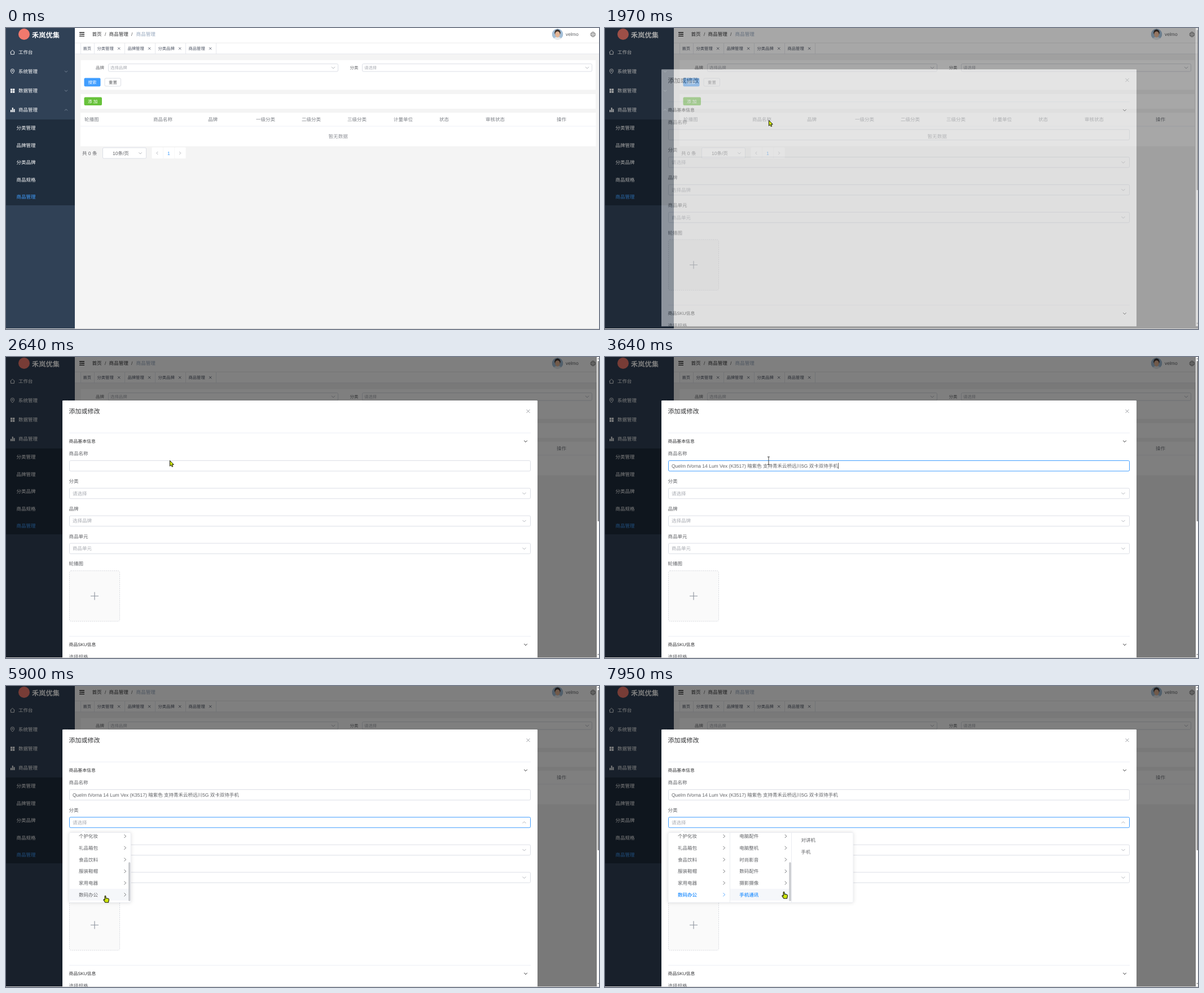
Recreate the animation shown at these times as an HTML page. Size 1051 by 533 pixels, loop 8000 ms.

```html
<!DOCTYPE html>
<html lang="zh-CN">
<head>
<meta charset="utf-8">
<title>商品管理</title>
<style>
html, body { margin: 0; width: 100%; height: 100%; overflow: hidden; background: #f4f4f4; }
svg { display: block; width: 1051px; height: 533px; }
text { font-family: "Liberation Sans", "Noto Sans CJK SC", "Noto Sans CJK", sans-serif; text-rendering: geometricPrecision; white-space: pre; }
</style>
</head>
<body>
<svg id="stage" viewBox="0 0 1051 533">
  <defs>
    <clipPath id="view"><rect width="1051" height="532"/></clipPath>
    <clipPath id="list"><rect x="112" y="260" width="330" height="123"/></clipPath>
    <clipPath id="face"><circle cx="977.5" cy="11" r="10"/></clipPath>
    <filter id="shadow" x="-10%" y="-10%" width="120%" height="120%">
      <feDropShadow dx="0" dy="0" stdDeviation="3" flood-color="#000" flood-opacity=".13"/>
    </filter>
  </defs>
</svg>
<script>
const LOOP = 8000, BLUE = '#409eff', TEXT = '#606266', HINT = '#a8abb2', LINE = '#dcdfe6';
const stage = document.getElementById('stage');

function el(tag, attrs, parent) {
  const node = document.createElementNS('http://www.w3.org/2000/svg', tag);
  for (const k in attrs) node.setAttribute(k, attrs[k]);
  return (parent || layer).appendChild(node);
}
const group = (parent, attrs = {}) => el('g', attrs, parent);
const rect = (x, y, w, h, fill, rx = 0) => el('rect', { x, y, width: w, height: h, fill, rx });
const box = (x, y, w, h, fill = '#fff', stroke = LINE, rx = 2) =>
  el('rect', { x: x + .5, y: y + .5, width: w - 1, height: h - 1, fill, stroke, rx });
const path = (d, stroke, width = 1, fill = 'none') =>
  el('path', { d, stroke, 'stroke-width': width, fill, 'stroke-linejoin': 'round' });
function text(x, cy, str, size = 8.5, fill = TEXT, extra = {}) {
  const node = el('text', { x, y: cy + size * .37, 'font-size': size, fill, ...extra });
  node.textContent = str;
  return node;
}
function chevron(x, y, r, angle, stroke, width = .9) {
  const g = group(layer, { transform: `translate(${x} ${y}) rotate(${angle})` });
  return el('path', { d: `M${-r} ${-r / 2}L0 ${r / 2}L${r} ${-r / 2}`, fill: 'none', stroke, 'stroke-width': width }, g);
}
const cross = (x, y, r, stroke, width = .8) =>
  path(`M${x - r} ${y - r}l${2 * r} ${2 * r}m0 ${-2 * r}l${-2 * r} ${2 * r}`, stroke, width);
const show = (node, on) => node.setAttribute('visibility', on ? 'visible' : 'hidden');

// Page
let layer = group(stage);
rect(0, 0, 1051, 533, '#f4f4f4');
rect(0, 0, 122, 532, '#304156');
rect(0, 162, 122, 152, '#1f2d3d');
el('circle', { cx: 32, cy: 11, r: 10, fill: '#f0796d' });
text(46, 12, '禾岚优集', 12.25, '#fff', { 'font-weight': 700 });
['工作台', '系统管理', '数据管理', '商品管理'].forEach((s, i) => text(22, 43 + i * 34.1, s, 8.5, '#fff'));
['分类管理', '品牌管理', '分类品牌', '商品规格', '商品管理'].forEach((s, i) =>
  text(18.5, 177.3 + i * 30.4, s, 8.5, i == 4 ? BLUE : '#fff'));
path('M7.5 43L11.5 39.3 15.5 43M8.6 42.2V46.6H14.4V42.2', '#fff', .9);
path('M11.5 81C9.4 78.6 8.3 77.2 8.3 75.8A3.2 3.2 0 0 1 14.7 75.8C14.7 77.2 13.6 78.6 11.5 81Z', '#fff', .9);
el('circle', { cx: 11.5, cy: 75.8, r: 1.1, fill: 'none', stroke: '#fff', 'stroke-width': .8 });
for (const [x, y] of [[8, 107.5], [12, 107.5], [8, 111.5], [12, 111.5]]) rect(x, y, 3.3, 3.3, '#fff');
for (const [x, h] of [[8, 4], [10.8, 8], [13.6, 5.5]]) rect(x, 149 - h, 1.9, h, '#fff');
chevron(106.5, 77, 2.5, 0, '#8a97a8', .8);
chevron(106.5, 111, 2.5, 0, '#8a97a8', .8);
chevron(106.5, 145, 2.5, 180, '#8a97a8', .8);

rect(122, 0, 929, 46, '#fff');
rect(122, 26, 929, 1, '#ebebeb');
rect(122, 45.5, 929, .8, '#dfe2e8');
path('M130 8H139M133 11.2H139M130 14.4H139', '#222', 1.4);
path('M132.3 9.6V12.8L130 11.2Z', 'none', 0, '#222');
text(152.5, 11.2, '首页', 8.6, '#303133');
text(175, 11.2, '/', 8.6, '#555');
text(182.5, 11.2, '商品管理', 8.6, '#303133');
text(222, 11.2, '/', 8.6, '#555');
text(230.5, 11.2, '商品管理', 8.6, '#97a8be');
const face = group(layer, { 'clip-path': 'url(#face)' });
el('circle', { cx: 977.5, cy: 11, r: 10, fill: '#a3bfd8' }, face);
el('ellipse', { cx: 977.5, cy: 21, rx: 8, ry: 5, fill: '#e6e9ec' }, face);
el('ellipse', { cx: 977.5, cy: 8.3, rx: 5.3, ry: 5.8, fill: '#3d3532' }, face);
el('ellipse', { cx: 977.5, cy: 11.3, rx: 4.3, ry: 5.4, fill: '#e3b596' }, face);
text(992, 11, 'velmo');
const GLOBE = '#666';
el('circle', { cx: 1040.3, cy: 11.4, r: 4.2, fill: 'none', stroke: GLOBE, 'stroke-width': .8 });
el('ellipse', { cx: 1040.3, cy: 11.4, rx: 1.8, ry: 4.2, fill: 'none', stroke: GLOBE, 'stroke-width': .7 });
path('M1036.2 10H1044.4M1036.2 12.9H1044.4', GLOBE, .7);

rect(132, 27, .8, 19, '#e2e4e9');
text(136.5, 36.2, '首页', 7.3, '#495060');
['分类管理', '品牌管理', '分类品牌', '商品管理'].forEach((s, i) => {
  const x = 156 + i * 54;
  rect(x, 27, .8, 19, '#e2e4e9');
  text(x + 5.5, 36.2, s, 7.3, '#495060');
  cross(x + 44.2, 36.3, 2.1, '#495060');
});
rect(372, 27, .8, 19, '#e2e4e9');

rect(132.5, 57, 912.5, 52.5, '#fff');
[[159, 181, '品牌', '选择品牌'], [609.5, 631, '分类', '请选择']].forEach(([lx, x, label, hint]) => {
  text(lx, 70, label, 7.4);
  box(x, 63, 408, 14.5);
  text(x + 4, 70.2, hint, 7.4, HINT);
  chevron(x + 399, 70.3, 3, 0, HINT);
});
rect(138.5, 88.5, 29, 15, BLUE, 2);
text(145.5, 96, '搜索', 7.4, '#fff');
box(174.5, 88.5, 29.5, 15);
text(182, 96, '重置', 7.4);
rect(132.5, 117, 912.5, 26, '#fff');
const addBtn = rect(138.5, 122.5, 31.5, 14.5, '#67c23a', 2);
text(145, 129.8, '添 加', 7.6, '#fff');

rect(132, 150, 913.5, 59.5, '#fff');
rect(132, 173.5, 913.5, .8, '#ebeef5');
const columns = { 轮播图: 139, 商品名称: 261, 品牌: 358, 一级分类: 443, 二级分类: 524, 三级分类: 605, 计量单位: 687, 状态: 768, 审核状态: 850, 操作: 976 };
for (const s in columns) text(columns[s], 162, s, 8.5, '#7d8087');
text(571.5, 192, '暂无数据', 8.6, '#909399');
text(135, 222, '共 0 条');
box(171, 211.5, 78, 20);
text(189, 222, '10条/页');
chevron(238, 221.7, 2.7, 0, HINT);
for (const x of [258.5, 278.8, 299]) rect(x, 211.5, 19.6, 19.5, '#fff', 1);
chevron(268, 221.5, 2.5, 90, HINT);
text(286, 222, '1', 8.5, BLUE);
chevron(308.5, 221.5, 2.5, -90, HINT);
rect(0, 532, 1051, 1, '#d6d6d6');

// Dialog
const mask = group(stage, { 'clip-path': 'url(#view)' });
layer = mask;
rect(0, 0, 1051, 532, 'rgba(0,0,0,.5)');
const dialog = layer = group(mask, { 'clip-path': 'url(#view)' });
rect(1047, 0, 4, 532, '#fafafa');
rect(1048.6, 7, 2.4, 284, '#8b8b8b', 1);
path('M1048.3 4L1051 4 1049.7 2ZM1048.3 526L1051 526 1049.7 528Z', 'none', 0, '#777');
rect(100, 77, 842, 460, '#fff', 1);
text(111.5, 96.3, '添加或修改', 11, '#303133');
cross(925.5, 96, 3, '#909399', .9);
for (const [y, s] of [[149, '商品基本信息'], [509, '商品SKU信息']]) {
  rect(112, y - 15, 818, .9, '#ebeef5');
  text(111.5, y, s, 7.9, '#303133');
  chevron(921, y + .3, 2.8, 0, '#303133', 1);
}
const fields = [['商品名称', ''], ['分类', '请选择'], ['品牌', '选择品牌'], ['商品单元', '商品单元']].map(([label, hint], i) => {
  const y = 183 + i * 48.8;
  text(111.5, y - 12, label);
  const frame = box(112, y, 818, 19.5);
  text(118, y + 9.7, hint, 8.5, HINT);
  return { frame, arrow: hint && chevron(918.5, y + 9.8, 3, 0, HINT) };
});
const product = text(118, 193, 'Quelm tVorna 14 Lum Vex (K3517) 暗紫色 支持青禾云桥远川5G 双卡双待手机');
const caret = rect(118.5, 187.5, .8, 10.5, '#333');
text(111.5, 366.3, '轮播图');
el('rect', { x: 112.5, y: 378.5, width: 89, height: 89.5, rx: 3, fill: '#fafafa', stroke: '#cdd0d6', 'stroke-width': .8, 'stroke-dasharray': '2 1.6' });
path('M150 423.3H164M157 416.3V430.3', '#8c939d', 1.1);
text(111.5, 531, '选择规格');

// Cascader
const PITCH = 20.7, MAX = 90, WIDTH = 109.3;
const popup = layer = group(stage);
const panel = el('rect', { x: 112, y: 259.5, width: WIDTH, height: 124, rx: 2, fill: '#fff', stroke: '#e4e7ed', 'stroke-width': .7, filter: 'url(#shadow)' });
path('M132.5 259.6L137 255.5 141.5 259.6', '#e4e7ed', .7, '#fff');
const lists = [
  ['玩具乐器', '汽车用品', '家居家装', '厨房餐饮', '个护化妆', '礼品箱包', '食品饮料', '服装鞋帽', '家用电器', '数码办公'],
  ['智能设备', '办公设备', '网络产品', '外设产品', '电脑配件', '电脑整机', '时尚影音', '数码配件', '摄影摄像', '手机通讯'],
  ['对讲机', '手机'],
].map((names, c) => {
  const x = 112 + c * WIDTH;
  const root = layer = group(popup, { 'clip-path': 'url(#list)' });
  if (c) rect(x - .4, 260, .8, 123, '#e4e7ed');
  const body = layer = group(root);
  const hover = rect(x + .5, 262.8, WIDTH - 1, PITCH, '#f5f7fa');
  const rows = names.map((s, i) => {
    const y = 273.2 + i * PITCH;
    return { label: text(x + 17, y, s), arrow: c < 2 && chevron(x + 99, y, 3, -90, TEXT, .9) };
  });
  layer = root;
  const thumb = rect(x + 105, 262, 3.4, 69, '#c9cbcf', 1.7);
  return { x, root, body, hover, rows, thumb };
});

// Pointers
const cursor = group(stage);
layer = cursor;
const LIME = '#cfe80c', INK = '#1c1c10';
const pointers = {
  arrow: path('M.4 .4V10.2L2.7 8.2 4.2 11.5 5.8 10.8 4.4 7.5H7.3Z', INK, 1, LIME),
  hand: path('M-.9 1.2Q0 -.3 .9 1.2V4.6L5 5.3Q6.6 5.8 6.5 7.4L5.6 12.2H-.2L-3 8.2Q-3.3 6.8 -2 6.9L-.9 7.9Z', INK, 1.1, LIME),
  beam: path('M-2 -6.5H2M0 -6.5V7M-2 7H2', '#333', .9),
};

// Screen refreshes come in bursts: start, end, count
const bursts = [[110, 310, 4], [510, 1280, 12], [1360, 2120, 11], [2200, 2370, 4], [2640, 3110, 7], [3510, 4280, 11],
  [4350, 5090, 12], [5160, 5900, 11], [6030, 6790, 12], [6860, 7620, 11], [7750, 7950, 4]];
function refreshTime(t) {
  let last = 0;
  for (const [a, b, n] of bursts) {
    if (t < a) break;
    const step = (b - a) / (n - 1);
    last = Math.min(b, a + Math.floor((t - a + 3) / step) * step);
  }
  return last;
}
const clamp = u => Math.max(0, Math.min(1, u));
const ramp = (t, a, d) => clamp((t - a) / d);
const smooth = u => u * u * (3 - 2 * u);
const easeOut = (u, k) => 1 - (1 - u) ** k;

const moves = [[110, 982, 501], [310, 523, 312], [440, 523, 312], [1280, 164, 132], [1360, 165, 130], [1890, 165, 130],
  [1968, 290, 163], [2120, 290, 177], [2370, 290, 183], [3560, 290, 183], [4120, 281, 239], [4490, 281, 239],
  [5090, 190, 335], [5500, 176, 371], [6100, 176, 371], [6790, 290, 352], [7500, 317, 364], [LOOP, 317, 364]];
function cursorAt(t) {
  const i = moves.findIndex(m => m[0] >= t);
  if (i < 1) return moves[0].slice(1);
  const [a, x0, y0] = moves[i - 1], [b, x1, y1] = moves[i];
  const u = smooth((t - a) / (b - a));
  return [x0 + (x1 - x0) * u, y0 + (y1 - y0) * u];
}
function pointerKind(t) {
  if (t < 1355 || (t > 1885 && t < 2650) || (t > 3720 && t < 3960)) return 'arrow';
  return t > 2600 && t < 3800 ? 'beam' : 'hand';
}

function draw(now) {
  const t = refreshTime(now);
  const [cx, cy] = cursorAt(t), kind = pointerKind(t);
  cursor.setAttribute('transform', `translate(${cx} ${cy})`);
  for (const k in pointers) show(pointers[k], t >= 110 && k == kind);

  addBtn.setAttribute('fill', t < 1355 || t > 1960 ? '#67c23a' : t > 1730 && t < 1885 ? '#529b2e' : '#95d475');

  const open = easeOut(ramp(t, 1840, 300), 2.1);
  show(mask, open > 0);
  mask.setAttribute('opacity', open);
  dialog.setAttribute('opacity', open);
  dialog.setAttribute('transform', `translate(0 ${-12 * (1 - open)})`);

  const typing = t > 2710 && t < 4190, filled = t >= 3505, picking = t > 4190;
  fields[0].frame.setAttribute('stroke', typing ? BLUE : LINE);
  fields[1].frame.setAttribute('stroke', picking ? BLUE : LINE);
  fields[1].arrow.setAttribute('transform', `rotate(${180 * smooth(ramp(t, 4200, 300))})`);
  product.setAttribute('visibility', filled ? 'inherit' : 'hidden');
  caret.setAttribute('visibility', typing ? 'inherit' : 'hidden');
  caret.setAttribute('x', filled ? 118.5 + product.getComputedTextLength() : 118.5);

  const drop = easeOut(ramp(t, 4200, 300), 5);
  popup.setAttribute('display', drop > 0 ? 'inline' : 'none');
  popup.setAttribute('opacity', drop);
  popup.setAttribute('transform', `translate(0 ${257 * (1 - drop)}) scale(1 ${drop})`);

  const level = t > 7800 ? 3 : t > 6090 ? 2 : 1;
  panel.setAttribute('width', WIDTH * level);
  const scrolls = [smooth(ramp(t, 5130, 640)), smooth(ramp(t, 6830, 640)), 0];
  const chosen = [t >= 6025, t >= 7745];
  lists.forEach((list, c) => {
    const shift = MAX * scrolls[c];
    list.root.setAttribute('display', c < level ? 'inline' : 'none');
    list.body.setAttribute('transform', `translate(0 ${-shift})`);
    const inside = cx > list.x && cx < list.x + WIDTH && cy > 262;
    const row = Math.floor((cy - 262.8 + shift) / PITCH);
    show(list.hover, inside && row < list.rows.length);
    list.hover.setAttribute('y', 262.8 + row * PITCH);
    show(list.thumb, inside && c < 2);
    list.thumb.setAttribute('y', 262 + 50 * scrolls[c]);
    if (c == 2) return;
    const { label, arrow } = list.rows[9];
    label.setAttribute('fill', chosen[c] ? BLUE : TEXT);
    label.setAttribute('font-weight', chosen[c] ? 700 : 400);
    arrow.setAttribute('stroke', chosen[c] ? BLUE : TEXT);
  });
}

const start = performance.now();
(function tick() {
  draw((performance.now() - start) % LOOP);
  requestAnimationFrame(tick);
})();
</script>
</body>
</html>
```
